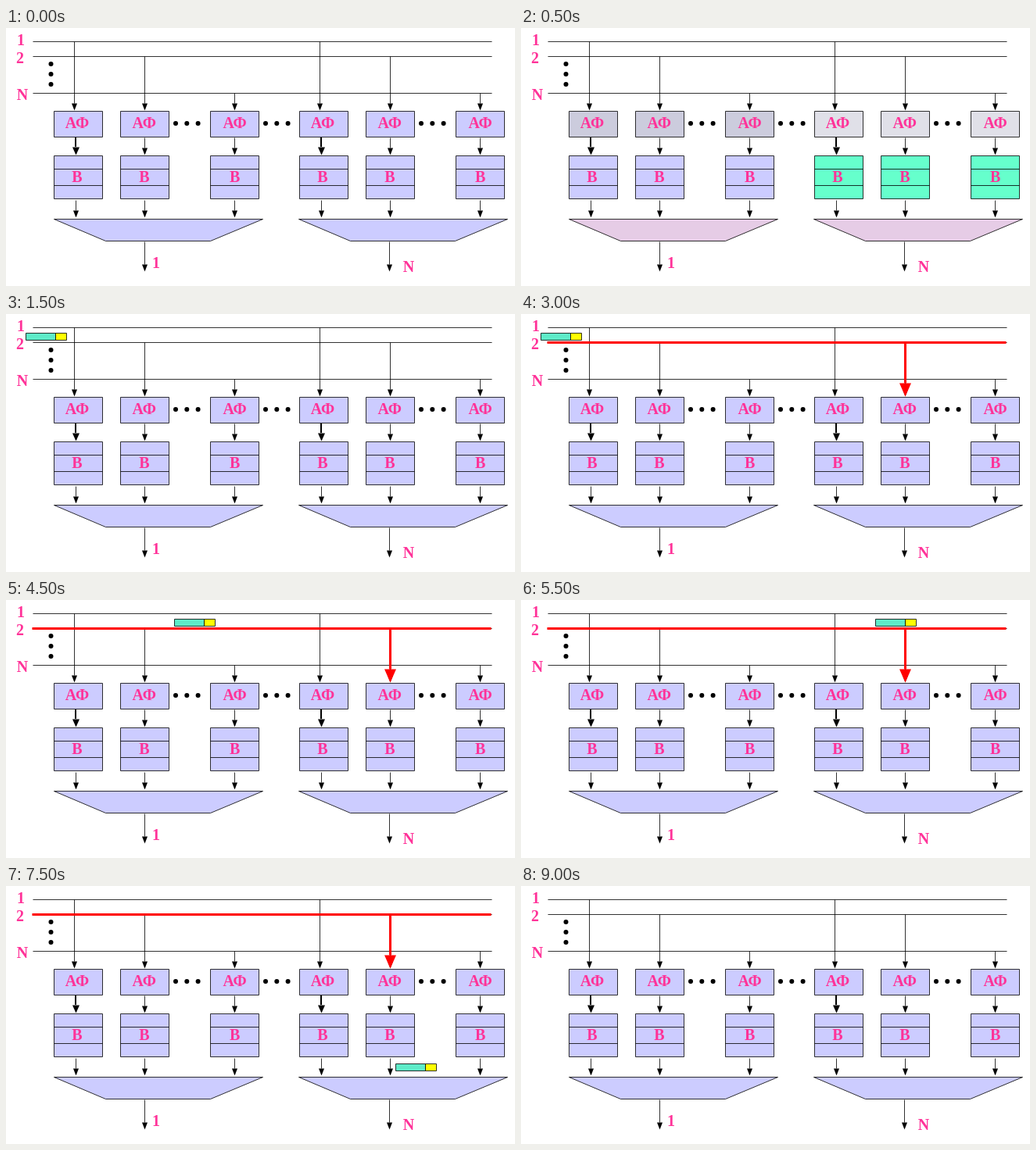
These frames come from a looping animation (651x330 px, 9500 ms). An HTML page with a canvas:

```html
<!DOCTYPE html>
<html lang="ru">
<head>
<meta charset="utf-8">
<style>
html, body { margin: 0; width: 100%; height: 100%; overflow: hidden; background: #fff; }
canvas { display: block; }
</style>
</head>
<body>
<canvas id="stage" width="651" height="330"></canvas>
<script>
const g = document.getElementById('stage').getContext('2d');
const STEP = 500, STEPS = 19;
const LILAC = '#ccccff', GREEN = '#66ffcc', CREAM = '#ffffcc', RED = '#ff0000';
const INK = 'rgba(0, 0, 0, .8)';
const columns = [61, 146, 261, 375, 460, 575];
const ACTIVE = 4;

// Packet position by step number
const packetAt = {
  3: [25, 24], 4: [25, 24], 5: [25, 24], 6: [25, 24], 7: [25, 24],
  8: [109, 24], 9: [215, 24], 10: [358, 24], 11: [453, 24], 12: [496, 56],
  13: [503, 90], 14: [464, 206], 15: [498, 227], 16: [468, 253], 17: [500, 282]
};

function makeHatch() {
  const tile = document.createElement('canvas');
  tile.width = tile.height = 4;
  const c = tile.getContext('2d');
  c.fillStyle = '#f4f4f4';
  c.fillRect(0, 0, 4, 4);
  c.fillStyle = '#b4b4b4';
  for (let i = 0; i < 4; i++) c.fillRect(i, i, 1, 1);
  return g.createPattern(tile, 'repeat');
}
const HATCH = makeHatch();

function line(x1, y1, x2, y2, color = INK, width = 1) {
  const shift = width % 2 / 2;
  g.strokeStyle = color;
  g.lineWidth = width;
  g.beginPath();
  g.moveTo(x1 + shift, y1 + shift);
  g.lineTo(x2 + shift, y2 + shift);
  g.stroke();
}

function polygon(points, fill, stroke) {
  g.beginPath();
  points.forEach(([x, y]) => g.lineTo(x + .5, y + .5));
  g.closePath();
  g.fillStyle = fill;
  g.fill();
  if (stroke) {
    g.strokeStyle = stroke;
    g.lineWidth = 1;
    g.stroke();
  }
}

function box(x, y, w, h, fill) {
  polygon([[x, y], [x + w, y], [x + w, y + h], [x, y + h]], fill, INK);
}

function arrow(x, y1, y2, { color = '#000', width = 1, half = 3.5, head = 9 } = {}) {
  line(x, y1, x, y2 - head, width === 1 ? INK : color, width);
  polygon([[x - half, y2 - head], [x + half, y2 - head], [x, y2]], color);
}

function dots(x, y, dx, dy) {
  g.fillStyle = '#000';
  for (let i = 0; i < 3; i++) {
    g.beginPath();
    g.arc(x + i * dx, y + i * dy, 3, 0, 7);
    g.fill();
  }
}

function label(text, x, y) {
  g.fillStyle = '#ff3399';
  g.fillText(text, x, y);
}

function colours(step, i) {
  const right = i > 2;
  if (step === 1) return [right ? '#e0e0e8' : '#ccccdd', right ? GREEN : LILAC];
  if (step === 2) return [right ? HATCH : '#cacaca', right ? GREEN : LILAC];
  const hot = i === ACTIVE;
  return [
    hot && step === 12 ? CREAM : LILAC,
    hot && (step === 13 || step === 14) ? CREAM : LILAC
  ];
}

function drawColumn(x, i, step) {
  const place = i % 3, first = place === 0;
  const [filter, buffer] = colours(step, i);
  const topX = x + (first ? 26 : 31);
  const lowX = x + (first ? 28 : 31);
  const textX = x + 30 + place * .8;

  arrow(topX, [17, 36, 83][place], 105);
  box(x, 106, 62, 33, filter);
  arrow(lowX, 140, 162, first ? { width: 2, half: 4.5, head: 10 } : {});
  box(x, 163, 62, 55, buffer);
  line(x, 180, x + 62, 180);
  line(x, 201, x + 62, 201);
  arrow(lowX, 220, 242);
  label('АФ', textX, 128);
  label('В', textX, 197);
}

function drawOutput(x, step, text, textX, textY) {
  const fill = step === 2 ? '#ffcccc' : step === 1 ? '#e6cce6' : LILAC;
  polygon([[x, 244], [x + 267, 244], [x + 200, 272], [x + 66, 272]], fill, INK);
  arrow(x + 116, 273, 311);
  label(text, textX, textY);
}

function drawPacket([x, y]) {
  box(x, y, 38, 9, '#5eebc8');
  box(x + 38, y, 14, 9, '#ffff00');
}

function draw(step) {
  g.fillStyle = '#fff';
  g.fillRect(0, 0, 651, 330);
  g.font = 'bold 20px "Liberation Serif", "Times New Roman", serif';
  g.textAlign = 'center';

  for (const y of [17, 36, 83]) line(34, y, 621, y);
  label('1', 19, 22);
  label('2', 18, 45);
  label('N', 21, 92);
  dots(57.5, 46, 0, 13);
  for (const x of [217, 332, 531]) dots(x, 122, 14.3, 0);

  columns.forEach((x, i) => drawColumn(x, i, step));
  drawOutput(61, step, '1', 192, 307);
  drawOutput(374, step, 'N', 515, 312);

  const busy = step >= 6 && step <= 17;
  if (step === 4 || busy) line(33, 36, 620, 36, RED, 3);
  if (busy && step !== 7) arrow(491, 36, 105, { color: RED, width: 3, half: 7.5, head: 17 });
  if (packetAt[step]) drawPacket(packetAt[step]);
}

const start = performance.now();
function tick() {
  draw(Math.floor((performance.now() - start) / STEP) % STEPS);
  requestAnimationFrame(tick);
}
tick();
</script>
</body>
</html>
```
